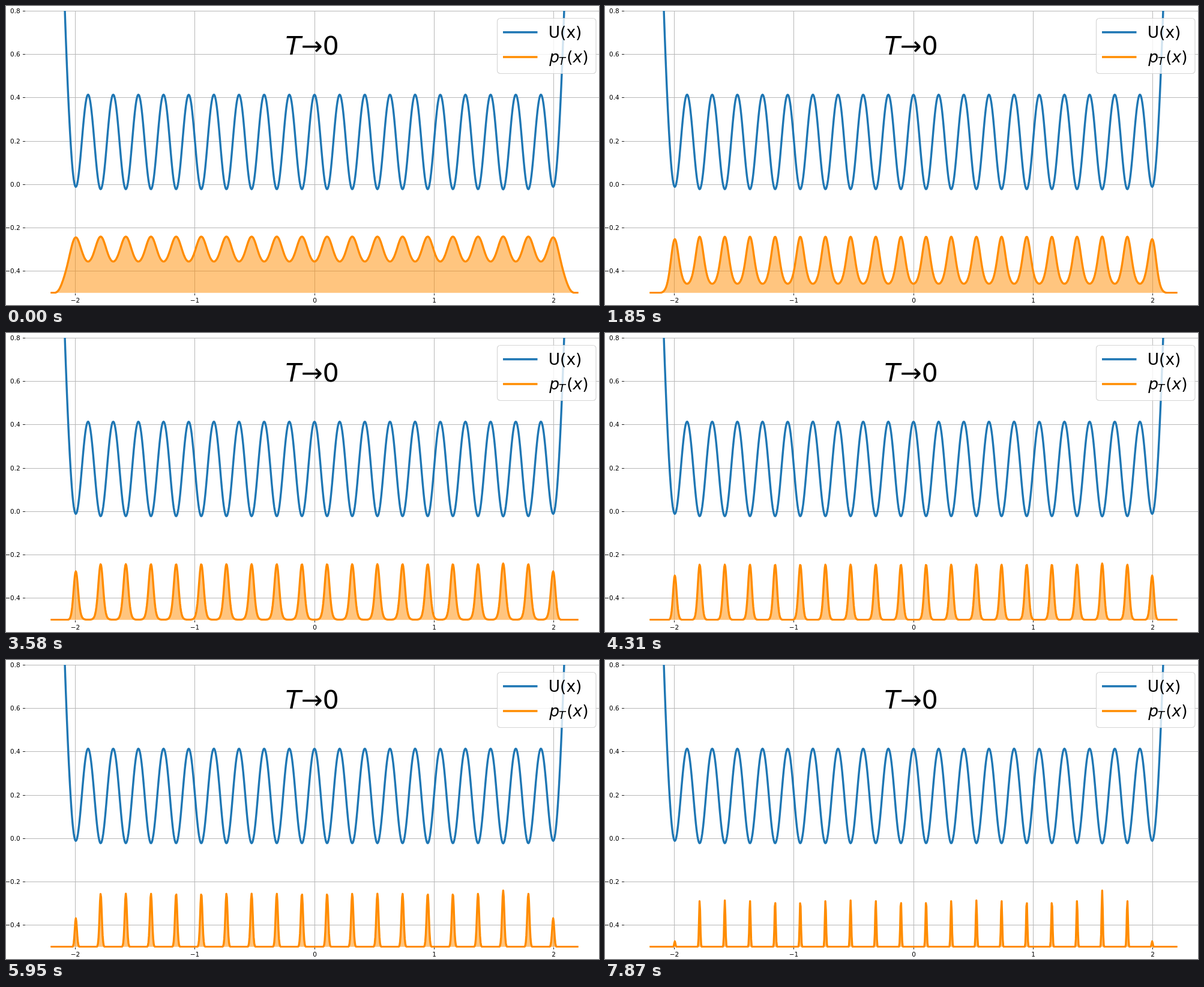
An HTML page with a canvas for the animation above (8000 ms loop, 988 by 498 pixels).

```html
<!DOCTYPE html>
<html lang="en">
<head>
<meta charset="utf-8">
<title>Boltzmann density while cooling</title>
<style>
html, body { margin: 0; width: 100%; height: 100%; overflow: hidden; background: #fff; }
canvas { display: block; }
</style>
</head>
<body>
<canvas id="plot" width="988" height="498"></canvas>
<script>
const ctx = document.getElementById('plot').getContext('2d');
const LOOP = 8000, BLUE = '#1f77b4', ORANGE = '#ff8c00', WIDTH = 3.4;
const px = x => 514 + 199.1 * x;
const py = y => 297.3 - 361 * y;

// Runs of equally spaced steps: [start in ms, count]
const runs = [[0, 1], [200, 4], [790, 4], [1380, 2], [1650, 1], [1850, 1], [1920, 1],
  [2120, 3], [2580, 1], [2730, 4], [3320, 5], [4040, 1], [4180, 2], [4510, 4],
  [5100, 4], [5690, 4], [6280, 2], [6560, 3], [7020, 4], [7610, 3]];
const starts = runs.flatMap(([t, n]) => Array.from({ length: n }, (_, i) => t + 130 * i));

// Ripple with 19 wells, steep walls, and one slightly deeper well
function potential(x) {
  const wall = (3.627 * Math.max(0, Math.abs(x) - 1.8423)) ** 8;
  const dip = 0.00098 * Math.exp(-(((x - 30 / 19) / 0.02) ** 2));
  return 0.1965 + 0.218 * Math.cos(9.5 * Math.PI * x) + wall - dip;
}
const xs = Array.from({ length: 1000 }, (_, i) => -2.2 + 4.4 * i / 999);
const us = xs.map(potential);
const uMin = Math.min(...us);

function trace(ys) {
  ctx.beginPath();
  xs.forEach((x, i) => ctx.lineTo(px(x), py(ys[i])));
}

function stroke(color, width) {
  ctx.strokeStyle = color;
  ctx.lineWidth = width;
  ctx.stroke();
}

function line(x1, y1, x2, y2, color, width) {
  ctx.beginPath();
  ctx.moveTo(x1, y1);
  ctx.lineTo(x2, y2);
  stroke(color, width);
}

function text(str, x, y, size, italic = '', align = 'left') {
  ctx.font = `${italic} ${size}px "DejaVu Sans", sans-serif`;
  ctx.textAlign = align;
  ctx.fillStyle = '#000';
  ctx.fillText(str, x, y);
}

const label = (v, digits) => v.toFixed(digits).replace('-', '\u2212');

function drawGrid() {
  for (let i = -2; i <= 4; i++) {
    const v = i / 5, y = Math.floor(py(v)) + 0.5;
    line(32, y, 988, y, '#b8b8b8', 1);
    line(28, y, 32, y, '#222', 1);
    text(label(v, 1), 23.8, y + 3.5, 10.5, '', 'right');
  }
  for (let v = -2; v <= 2; v++) {
    const x = Math.floor(px(v)) + 0.5;
    line(x, 8, x, 479, '#b8b8b8', 1);
    line(x, 479, x, 482, '#222', 1);
    text(label(v, 0), x, 493.5, 10.5, '', 'center');
  }
}

function drawCurves(temp) {
  const ps = us.map(u => -0.5 + 0.26 * Math.exp((uMin - u) / temp));
  ctx.save();
  ctx.beginPath();
  ctx.rect(32, 8, 956, 471);
  ctx.clip();
  ctx.lineJoin = 'round';
  ctx.lineCap = 'square';
  trace(ps);
  ctx.fillStyle = 'rgba(255, 140, 0, 0.5)';
  ctx.fill();
  trace(us);
  stroke(BLUE, WIDTH);
  trace(ps);
  stroke(ORANGE, WIDTH);
  ctx.restore();
}

function drawLegend() {
  ctx.beginPath();
  ctx.roundRect(818.5, 20.5, 164.5, 92, 5);
  ctx.fillStyle = 'rgba(255, 255, 255, 0.8)';
  ctx.fill();
  stroke('rgba(204, 204, 204, 0.8)', 1.2);
  line(828, 43.7, 885.5, 43.7, BLUE, WIDTH);
  line(828, 85, 885.5, 85, ORANGE, WIDTH);
  text('U(x)', 903.7, 53, 26.5);
  text('p', 905.3, 94, 26.5, 'italic');
  text('T', 920.7, 98, 18.5, 'italic');
  text('(', 934.2, 94, 26.5);
  text('x', 944.5, 94, 26.5, 'italic');
  text(')', 960.2, 94, 26.5);
}

function drawTitle() {
  text('T', 465.5, 81, 43, 'italic');
  text('\u2192', 491.8, 81, 43);
  text('0', 527.5, 81, 43);
}

function frame() {
  const t = performance.now() % LOOP;
  const step = starts.filter(s => s <= t).length - 1;
  ctx.fillStyle = '#fff';
  ctx.fillRect(0, 0, 988, 498);
  drawGrid();
  drawCurves(0.745 * 0.91 ** step);
  drawTitle();
  drawLegend();
  requestAnimationFrame(frame);
}
frame();
</script>
</body>
</html>
```
